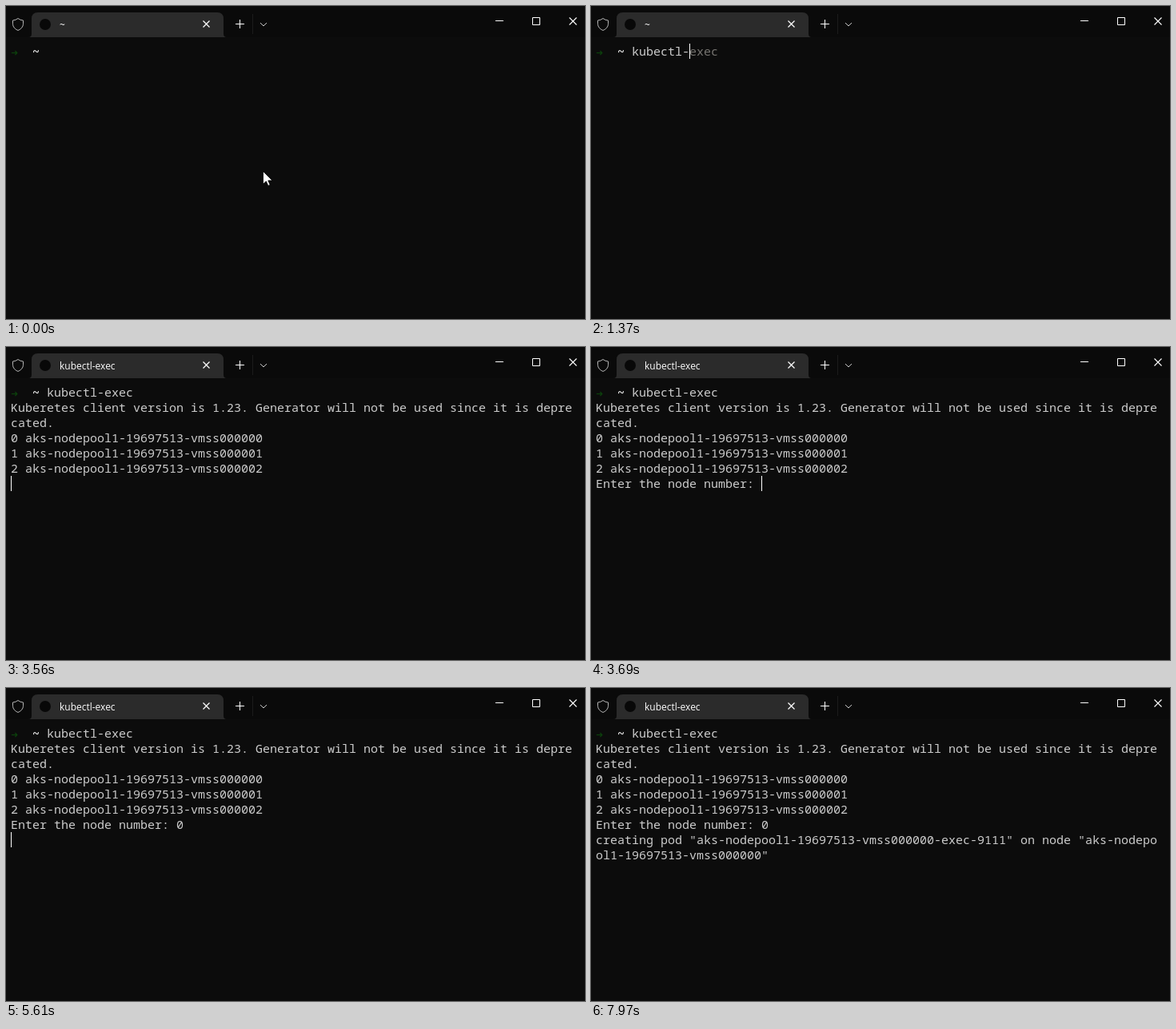
Animation, 724 px wide and 391 px high, one loop 8 s. Source, as an HTML page:

```html
<!DOCTYPE html>
<html lang="en">
<head>
<meta charset="utf-8">
<title>Terminal</title>
<style>
  html, body { margin: 0; width: 100%; height: 100%; overflow: hidden; background: #0c0c0c; }
  svg { display: block; }
  text { white-space: pre; }
  .term { font: 15px "Noto Sans Mono", monospace; fill: #ccc; }
  .title { font: 500 12px "Open Sans", "Noto Sans", sans-serif; fill: #fff; }
  .ghost { fill: #767470; }
  .tilde { font-weight: 700; fill: #f0f0f0; }
  .arrow { font: 11px "DejaVu Sans", sans-serif; fill: #0c3f0c; }
  .icon { fill: none; stroke: #fff; stroke-width: 1; }
</style>
</head>
<body>
<svg width="724" height="391" viewBox="0 0 724 391">
  <rect width="724" height="391" fill="#0c0c0c"/>
  <rect width="724" height="39" fill="#0a0a0a"/>

  <path d="M28 39Q32 39 32 35V16Q32 8 40 8H264Q272 8 272 16V35Q272 39 276 39Z" fill="#2b2b2b"/>
  <path d="M308.5 10V35" stroke="#1c1c1c"/>
  <circle cx="49" cy="23" r="7" fill="#080808"/>
  <text id="title" class="title" x="67" y="28"></text>

  <g class="icon">
    <path d="M15 15.5Q17.8 17.8 21.5 18V22.5Q21.3 27.7 15 30.5Q8.7 27.7 8.5 22.5V18Q12.2 17.8 15 15.5Z" stroke="#b4b4b4"/>
    <path d="M246.5 18.5l8 8m0-8l-8 8" stroke-width="1.2"/>
    <path d="M287 22.5h11M292.5 17v11"/>
    <path d="M318 21l4 4 4-4" stroke="#c8c8c8"/>
    <path d="M612 18.5h10M658.5 14.5h9v9h-9z"/>
    <path d="M704.5 14.5l9 9m0-9l-9 9" stroke-width="1.1"/>
  </g>

  <text class="arrow" x="6" y="62">➜</text>
  <text class="term tilde" x="33" y="62">~</text>
  <text class="term" x="51" y="62"><tspan id="typed"></tspan><tspan id="ghost" class="ghost"></tspan></text>
  <g id="output" class="term"></g>
  <rect id="cursor" width="1" height="19" fill="#fff"/>
  <path id="pointer" d="M321.5 206.5V222.5L325.3 219L327.8 224.5L330.2 223.4L327.8 218H333Z" fill="#fff" stroke="#000" stroke-width=".8"/>
</svg>
<script>
  const LOOP = 8000, CELL = 9, LINE = 19, LEFT = 6, TOP = 47, BASELINE = 15;
  const COMMAND = "kubectl-exec";
  const KEYS = [70, 340, 480, 550, 760, 1030, 1100, 1370, 1590, 1870, 2340, 2670];
  const ENTER = 2860;

  // [time, row, text, column]
  const OUTPUT = [
    [2930, 1, "Kuberetes client version is 1.23. Generator will not be used since it is depre"],
    [2930, 2, "cated."],
    [3560, 3, "0 aks-nodepool1-19697513-vmss000000"],
    [3560, 4, "1 aks-nodepool1-19697513-vmss000001"],
    [3560, 5, "2 aks-nodepool1-19697513-vmss000002"],
    [3690, 6, "Enter the node number: "],
    [5410, 6, "0", 23],
    [6290, 7, 'creating pod "aks-nodepool1-19697513-vmss000000-exec-9111" on node "aks-nodepo'],
    [6290, 8, 'ol1-19697513-vmss000000"']
  ];

  // [time, column, row]; no position means hidden
  const CURSOR = [
    [0],
    ...KEYS.map((time, i) => [time, 6 + i, 0]),
    [ENTER, 0, 1], [2930, 0, 3], [3560, 0, 6],
    [3690, 23, 6], [4090], [4650, 23, 6], [5200], [5340, 23, 6], [5410, 24, 6],
    [5610, 0, 7], [6290, 0, 9], [6830], [7360, 0, 9], [7970]
  ];

  const byId = id => document.getElementById(id);
  const [title, typed, ghost, output, cursor, pointer] =
    ["title", "typed", "ghost", "output", "cursor", "pointer"].map(byId);
  const show = (node, on) => node.setAttribute("visibility", on ? "visible" : "hidden");
  const setText = (node, text) => { if (node.textContent !== text) node.textContent = text; };

  const lines = OUTPUT.map(([time, row, text, column = 0]) => {
    const node = document.createElementNS("http://www.w3.org/2000/svg", "text");
    node.setAttribute("x", LEFT + column * CELL);
    node.setAttribute("y", TOP + row * LINE + BASELINE);
    node.textContent = text;
    output.append(node);
    return { time, node };
  });

  function draw(t) {
    const count = KEYS.filter(time => time <= t).length;
    setText(typed, COMMAND.slice(0, count));
    setText(ghost, count ? COMMAND.slice(count) : "");
    setText(title, t < ENTER ? "~" : COMMAND);
    show(pointer, t < KEYS[0]);
    for (const { time, node } of lines) show(node, t >= time);

    const [, column, row] = CURSOR.filter(([time]) => time <= t).pop();
    show(cursor, row !== undefined);
    if (row !== undefined) {
      cursor.setAttribute("x", LEFT + column * CELL);
      cursor.setAttribute("y", TOP + row * LINE);
    }
  }

  function tick() {
    draw(performance.now() % LOOP);
    requestAnimationFrame(tick);
  }
  tick();
</script>
</body>
</html>
```
